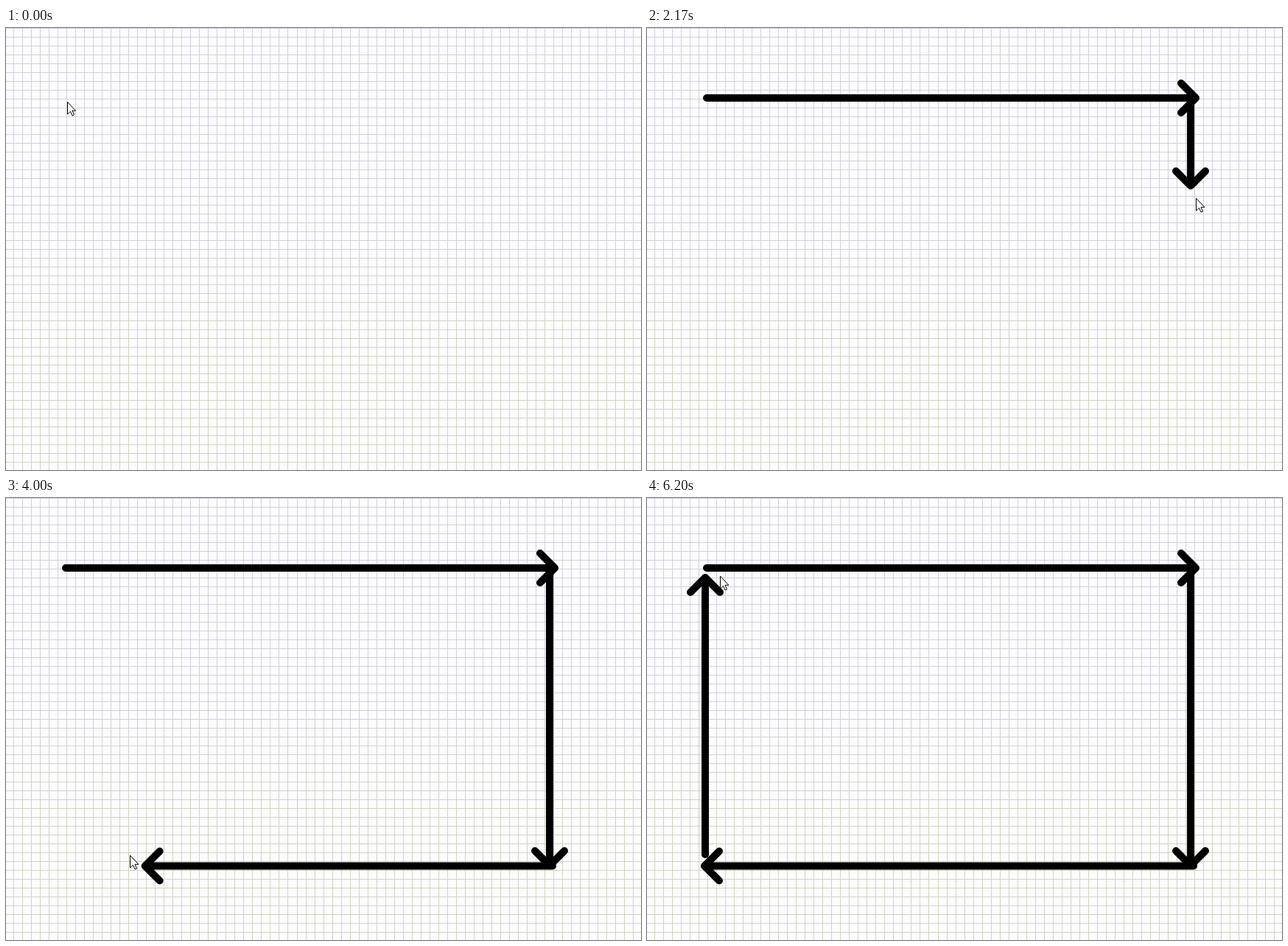
Recreate the animation shown at these times as an HTML page with a canvas. Size 862x600 px, loop 6.23 s.

```html
<!DOCTYPE html>
<html lang="en">
<head>
<meta charset="utf-8">
<title>Arrows on a grid</title>
<style>
  html, body { margin: 0; width: 100%; height: 100%; overflow: hidden; background: #fcfcfe; }
  canvas { display: block; }
</style>
</head>
<body>
<canvas id="stage" width="862" height="600"></canvas>
<script>
const W = 862, H = 600, LOOP = 6230, STEP = 100 / 3;
const PITCH = 12.016;   // grid spacing
const HEAD = 20;        // arrow head reach
const LEAD = 28;        // ms the pointer runs ahead of the drawn tip
const ctx = document.getElementById('stage').getContext('2d');

// Each tip is dragged along one axis to `to`, then may slip back to `rest`.
// `lane` is the fixed coordinate, `aside` the pointer's drift across the lane.
const arrows = [
  { axis: 'x', lane: 95, tail: 81, from: 76, to: 745, start: 260, turn: 1340,
    bend: 0.8, offset: -2, aside: [97, 102] },
  { axis: 'y', lane: 738, tail: 100, from: 102, to: 499, start: 1960, turn: 3130,
    bend: 0.61, offset: 1, aside: [746, 742] },
  { axis: 'x', lane: 499.5, tail: 742, from: 738, to: 47, start: 3330, turn: 4300,
    bend: 0.93, offset: 2, aside: [492, 484], rest: 78, stop: 4830 },
  { axis: 'y', lane: 79, tail: 484, from: 480, to: 90, start: 5180, turn: 5960,
    bend: 1, offset: -2, aside: [80, 99], rest: 108, stop: 6200 }
];

const mix = (a, b, u) => a + (b - a) * u;

// Smooth start and stop; a bend below 1 makes the start quicker.
function ease(t, start, end, bend = 1) {
  const u = Math.min(1, Math.max(0, (t - start) / (end - start))) ** bend;
  return u * u * (3 - 2 * u);
}

const progress = (a, t) => ease(t, a.start, a.turn, a.bend);

function tipAt(a, t) {
  const slip = a.stop ? (a.rest - a.to) * ease(t, a.turn, a.stop) : 0;
  return mix(a.from, a.to, progress(a, t)) + slip;
}

const place = (a, along, across) => a.axis === 'x' ? [along, across] : [across, along];

function pointerAt(t) {
  const a = arrows.findLast(item => t >= item.start) || arrows[0];
  const ahead = t + LEAD;
  const spot = place(a, tipAt(a, ahead) + a.offset, mix(...a.aside, progress(a, ahead)));
  const arrive = ease(t, 0, 130);
  return [mix(83, spot[0], arrive), mix(100, spot[1], arrive)];
}

function drawGrid() {
  ctx.fillStyle = '#fcfcfe';
  ctx.fillRect(0, 0, W, H);
  const tint = ctx.createLinearGradient(0, 0, 0, H);
  tint.addColorStop(0.4, '#d0d0db');
  tint.addColorStop(0.75, '#d2d3bf');
  ctx.fillStyle = tint;
  for (let x = 10; x < W; x += PITCH) ctx.fillRect(Math.round(x), 0, 1, H);
  for (let y = 0; y < H; y += PITCH) ctx.fillRect(0, Math.round(y), W, 1);
}

function drawArrow(a, t) {
  const tip = tipAt(a, t), back = tip - Math.sign(a.to - a.from) * HEAD;
  ctx.lineWidth = 10;
  ctx.lineCap = ctx.lineJoin = 'round';
  ctx.strokeStyle = '#000';
  ctx.beginPath();
  ctx.moveTo(...place(a, a.tail, a.lane));
  ctx.lineTo(...place(a, tip, a.lane));
  ctx.moveTo(...place(a, back, a.lane - HEAD));
  ctx.lineTo(...place(a, tip, a.lane));
  ctx.lineTo(...place(a, back, a.lane + HEAD));
  ctx.stroke();
}

const cursor = new Path2D('M0 0V16.5L4 12.8L6.5 18.5L9 17.5L6.5 11.8H11Z');

function drawCursor(t) {
  const [x, y] = pointerAt(t).map(Math.round);
  ctx.save();
  ctx.translate(x + 0.5, y + 0.5);
  ctx.lineWidth = 1;
  ctx.lineJoin = 'miter';
  ctx.fillStyle = '#fff';
  ctx.strokeStyle = '#000';
  ctx.fill(cursor);
  ctx.stroke(cursor);
  ctx.restore();
}

const origin = performance.now();

function draw() {
  const now = Math.max(0, performance.now() - origin) % LOOP;
  const t = Math.round(Math.floor(now / STEP + 0.11) * STEP / 10) * 10;
  drawGrid();
  for (const a of arrows) if (t >= a.start) drawArrow(a, t);
  drawCursor(t);
  requestAnimationFrame(draw);
}
draw();
</script>
</body>
</html>
```
